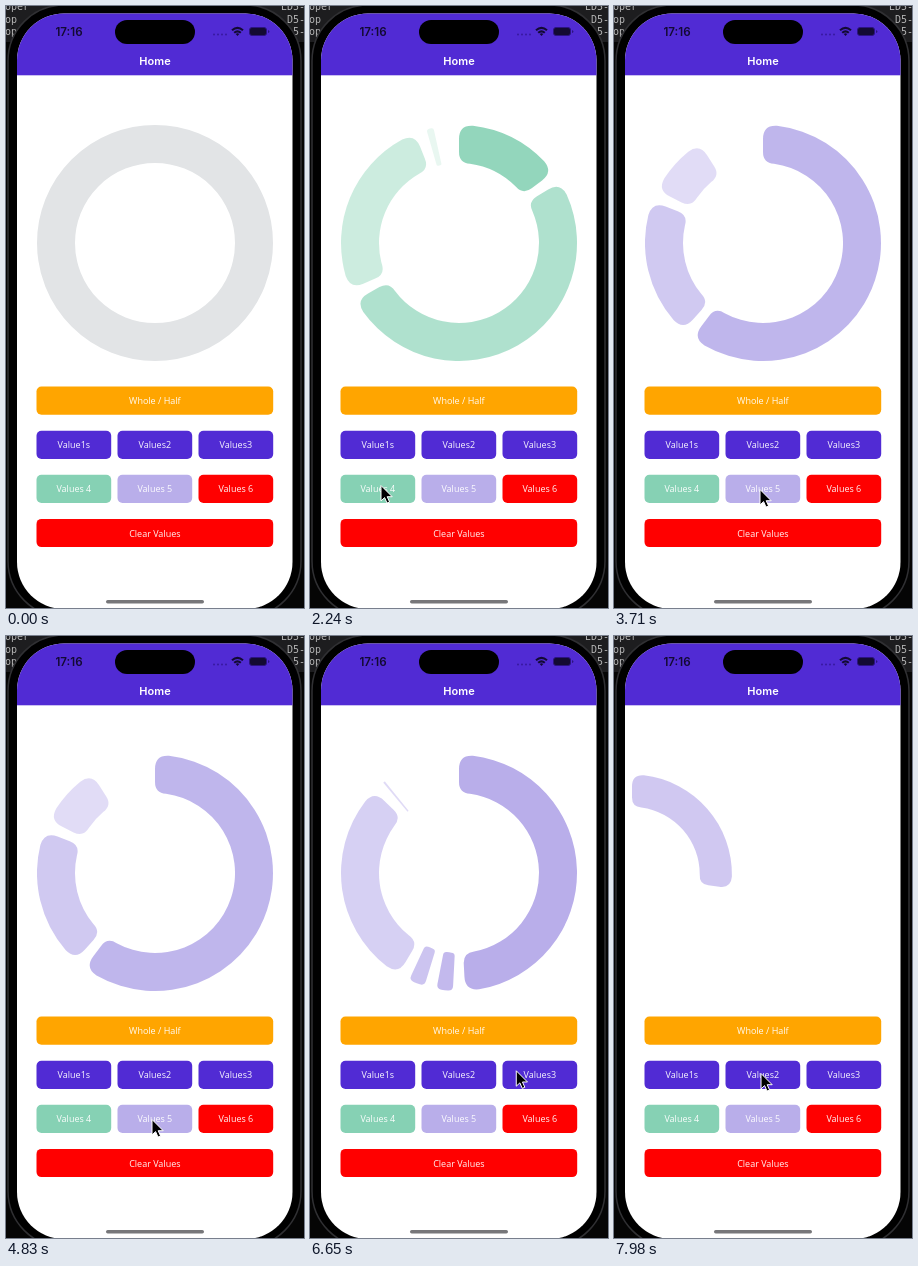
These frames come from a looping animation (298 by 602 pixels, 8 s). An HTML page:

```html
<!DOCTYPE html>
<html lang="en">
<head>
<meta charset="utf-8">
<title>Home</title>
<style>
  html, body { margin: 0; width: 100%; height: 100%; overflow: hidden; background: #000; }
  svg { display: block; width: 100vw; height: 100vh; }
  .btn { font: 9px "Open Sans", sans-serif; fill: #fff; fill-opacity: .96; text-anchor: middle; }
  .bar { font: 600 11px Inter, sans-serif; text-anchor: middle; }
  .term { font: 10px "DejaVu Sans Mono", monospace; fill: #b4b4b4; }
</style>
</head>
<body>
<svg viewBox="0 0 298 602">
  <rect width="298" height="602" fill="#050505"/>
  <rect width="298" height="36" fill="#1d1d1f"/>
  <g class="term">
    <text x="-1" y="4">oper</text><text x="-1" y="17">op</text><text x="-1" y="29">op</text>
    <text x="275" y="4">ED5-</text><text x="281" y="17">D5-</text><text x="287" y="29">5-</text>
  </g>
  <rect x="2" y="-1" width="293" height="612" rx="56" fill="#000" stroke="#303033" stroke-width="1.5"/>
  <clipPath id="screen"><rect x="11" y="7.5" width="275.5" height="595.5" rx="47"/></clipPath>
  <g clip-path="url(#screen)">
    <rect x="11" y="7" width="276" height="597" fill="#fff"/>
    <rect x="11" y="7" width="276" height="62.3" fill="#512bd4"/>
    <circle id="empty" cx="149" cy="237" r="99" fill="none" stroke="#e2e4e6" stroke-width="38"/>
    <g id="chart"></g>
    <g id="buttons"></g>
    <rect x="100" y="594" width="98" height="3.4" rx="1.7" fill="#77777a"/>
  </g>
  <rect x="109" y="14" width="80" height="24" rx="12" fill="#000"/>
  <text class="bar" x="63" y="30" fill="#130a33" style="font-size:11.6px">17:16</text>
  <text class="bar" x="149" y="59.3" fill="#fff">Home</text>
  <g fill="#3719a0">
    <circle cx="208" cy="28.5" r="1"/><circle cx="212" cy="28.5" r="1"/>
    <circle cx="216" cy="28.5" r="1"/><circle cx="220" cy="28.5" r="1"/>
  </g>
  <path d="M226 24.2Q231.5 19.4 237 24.2M228.2 26.7Q231.5 23.9 234.8 26.7" fill="none" stroke="#130a33" stroke-width="2.1"/>
  <path d="M231.5 30L229.7 28Q231.5 26.7 233.3 28Z" fill="#130a33"/>
  <rect x="243.5" y="21.5" width="17" height="8" rx="2.5" fill="#130a33" stroke="#2c1480"/>
  <path d="M262 24v3q1.4-.5 1.4-1.5t-1.4-1.5" fill="#2c1480"/>
  <path id="cursor" d="M0 0V15.4L3.6 12.1L6 17.6L8.6 16.5L6.2 11.2H11.2Z" fill="#000" stroke="#fff" stroke-width="1" stroke-linejoin="round"/>
</svg>
<script>
const LOOP = 8000;
const NS = 'http://www.w3.org/2000/svg';
const $ = id => document.getElementById(id);

function add(parent, tag, attrs, text) {
  const el = document.createElementNS(NS, tag);
  for (const k in attrs) el.setAttribute(k, attrs[k]);
  if (text) el.textContent = text;
  parent.appendChild(el);
  return el;
}

const purple = '#512bd4', red = '#ff0000', green = '#86d1b4', lilac = '#b9aeea';
const rows = [
  [['Whole / Half', '#ffa500']],
  [['Value1s', purple], ['Values2', purple], ['Values3', purple]],
  [['Values 4', green], ['Values 5', lilac], ['Values 6', red]],
  [['Clear Values', red]]
];
rows.forEach((row, r) => row.forEach(([label, fill], c) => {
  const width = row.length > 1 ? 74.7 : 236.7;
  const x = 30.5 + c * 81, y = 380.6 + r * 44.1;
  add($('buttons'), 'rect', { x, y, width, height: 28.2, rx: 5, fill });
  add($('buttons'), 'text', { x: x + width / 2, y: y + 17.6, class: 'btn' }, label);
}));

// Each click morphs the slices to new spans in degrees; every slice is paler than the one before.
const GAP = 6;
const charts = [
  { at: 1500, time: 740, fill: green, alpha: .89, fade: .235, spans: [53, 182, 91, 3.5] },
  { at: 3500, time: 210, fill: lilac, alpha: .9, fade: .235, spans: [216.5, 68, 31] },
  { at: 5480, time: 260, fill: lilac, alpha: 1, fade: .14, spans: [177, 8, 8, 103, 1] },
  { at: 7350, time: 140, fill: lilac, alpha: .67, fade: .67, spans: [98] }
];
const slide = { at: 7350, time: 630, dx: -131, dy: 1.5, shrink: .153 };

// Pointer trips: departure, duration, tip position on arrival.
const home = { x: 158, y: 598 };
const trips = [
  { at: 70, time: 830, x: 71, y: 479.5 },
  { at: 3220, time: 280, x: 146, y: 483.5 },
  { at: 5040, time: 420, x: 234, y: 433.5 },
  { at: 6440, time: 560, x: 147, y: 437.5 }
];

const mix = (a, b, k) => a + (b - a) * k;
const smooth = k => k * k * (3 - 2 * k);
const easeOut = k => 1 - (1 - k) * (1 - k);
const progress = (step, t) => Math.min(1, Math.max(0, (t - step.at) / step.time));

function slice(from, to) {
  const a = from * Math.PI / 180, b = to * Math.PI / 180;
  const inner = 80, outer = 118, span = b - a;
  const p = (r, q) => (r * Math.sin(q)).toFixed(2) + ' ' + (-r * Math.cos(q)).toFixed(2);
  const c = Math.min(14, span * outer * .3), d = Math.min(11, span * inner * .3);
  const u = c / outer, v = d / inner;
  const big = cut => span - 2 * cut > Math.PI ? 1 : 0;
  return `M${p(outer - c, a)}Q${p(outer, a)} ${p(outer, a + u)}` +
    `A${outer} ${outer} 0 ${big(u)} 1 ${p(outer, b - u)}Q${p(outer, b)} ${p(outer - c, b)}` +
    `L${p(inner + d, b)}Q${p(inner, b)} ${p(inner, b - v)}` +
    `A${inner} ${inner} 0 ${big(v)} 0 ${p(inner, a + v)}Q${p(inner, a)} ${p(inner + d, a)}Z`;
}

const slices = Array.from({ length: 5 }, () => add($('chart'), 'path', {}));

function drawChart(t) {
  const i = charts.findLastIndex(c => c.at <= t);
  $('empty').style.display = i < 0 ? '' : 'none';
  $('chart').style.display = i < 0 ? 'none' : '';
  if (i < 0) return;
  const chart = charts[i], before = i ? charts[i - 1].spans : [];
  const k = easeOut(progress(chart, t));
  let angle = 0;
  slices.forEach((el, n) => {
    const span = n < chart.spans.length ? mix(before[n] || 0, chart.spans[n], k) : 0;
    el.setAttribute('d', span > .2 ? slice(angle, angle + span) : '');
    el.setAttribute('fill', chart.fill);
    el.setAttribute('fill-opacity', Math.max(0, chart.alpha - n * chart.fade));
    angle += span + GAP;
  });
  const s = progress(slide, t), late = s ** 3;
  const x = 149 + slide.dx * easeOut(s), y = 237 + slide.dy * late;
  $('chart').setAttribute('transform', `translate(${x} ${y}) scale(${1 - slide.shrink * late})`);
}

function drawCursor(t) {
  let { x, y } = home;
  for (const trip of trips) {
    const k = smooth(progress(trip, t));
    x = mix(x, trip.x, k);
    y = mix(y, trip.y, k);
  }
  $('cursor').style.display = t < trips[0].at ? 'none' : '';
  $('cursor').setAttribute('transform', `translate(${x} ${y})`);
}

const begin = performance.now();
function tick() {
  const t = (performance.now() - begin) % LOOP;
  drawChart(t);
  drawCursor(t);
  requestAnimationFrame(tick);
}
tick();
</script>
</body>
</html>
```
